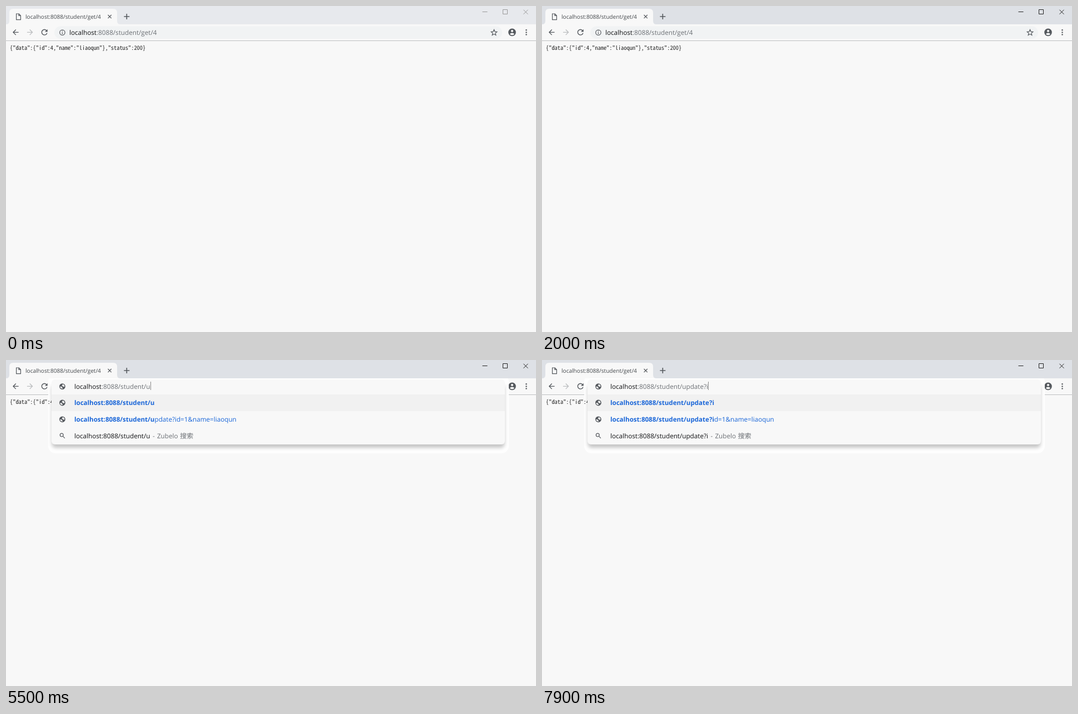
An HTML page for the animation above (8000 ms loop, 954 px wide and 587 px high).

```html
<!DOCTYPE html>
<html lang="en">
<head>
<meta charset="utf-8">
<title>Browser address bar</title>
<style>
  html, body { margin: 0; width: 100%; height: 100%; overflow: hidden; background: #f8f8f8; }
  svg { display: block; width: 954px; height: 587px; }
  text { font: 11.7px "Open Sans", "Noto Sans", sans-serif; text-rendering: geometricPrecision; white-space: pre; }
  .title { font-size: 10.1px; fill: #45494d; }
  .json { font: 300 10.4px "Noto Sans Mono CJK SC", "Noto Sans Mono", monospace; fill: #222; }
  .host { fill: #111214; }
  .path { fill: #6c7075; }
  .link { fill: #1a66d8; }
  .match { font-size: 11.55px; font-weight: 700; }
  .cjk { font: 12px "Noto Sans CJK SC", sans-serif; }
  .icon { fill: #55595e; }
  .line { fill: none; stroke: #55595e; stroke-width: 1.2; }
</style>
</head>
<body>
<svg viewBox="0 0 954 587">
  <defs>
    <filter id="soft" x="-5%" y="-20%" width="110%" height="150%">
      <feGaussianBlur stdDeviation="3.2"/>
    </filter>
    <clipPath id="belowTabs"><rect y="33" width="954" height="554"/></clipPath>
    <g id="globe">
      <circle r="5.4"/>
      <path fill="#f8f8f8" d="M.4 -4.1Q3.6 -3.6 4.1 0Q2.6 1.2 1.4 .4Q1.2 -.8 -.6 -.8Q-1.4 -2 .2 -2.4ZM-4.1 .2Q-.8 -.2 -.6 1.6Q.8 2 .4 4.1Q-3.6 4 -4.1 .2Z"/>
    </g>
    <path id="arrow" transform="scale(.66) translate(-12 -12)" d="M20 11H7.83l5.59-5.59L12 4l-8 8 8 8 1.41-1.41L7.83 13H20z"/>
  </defs>

  <!-- page and tab strip -->
  <rect width="954" height="587" fill="#f8f8f8"/>
  <rect id="strip" width="954" height="33"/>
  <path fill="#f8f8f8" d="M0 33Q6 33 6 27V12Q6 5 13 5H193Q200 5 200 12V27Q200 33 206 33Z"/>
  <path id="doc" class="line" d="M18.6 14H23.2L26.4 17.2V24.6H18.6ZM23 14V17.4H26.4"/>
  <path id="spinner" class="line" d="M22 14.2A4.8 4.8 0 1 0 26.8 19"/>
  <text class="title" x="35" y="23">localhost:8088/student/get/4</text>
  <path class="line" d="M183.5 16l6.2 6.2M189.7 16l-6.2 6.2"/>
  <path class="line" style="stroke-width:1.6" d="M212.3 19h10M217.3 14v10"/>
  <path id="controls" fill="none" d="M857.5 10.5h9M894.5 6.5h8v8h-8zM931.5 6.8l8 8M939.5 6.8l-8 8"/>

  <!-- toolbar -->
  <path d="M0 62.5H954" stroke="#bdbfc1"/>
  <use href="#arrow" class="icon" transform="translate(17.3 47.3)"/>
  <use href="#arrow" fill="#bcbec0" transform="translate(43.2 47.3) scale(-1 1)"/>
  <path id="reload" class="icon" transform="translate(69.2 47.3) scale(.69) translate(-12 -12)" d="M17.65 6.35C16.2 4.9 14.21 4 12 4c-4.42 0-7.99 3.58-7.99 8s3.57 8 7.99 8c3.73 0 6.84-2.55 7.73-6h-2.08c-.82 2.33-3.04 4-5.65 4-3.31 0-6-2.69-6-6s2.69-6 6-6c1.66 0 3.14.69 4.22 1.78L13 11h7V4z"/>
  <path id="stop" class="line" style="stroke-width:1.5" d="M64.8 43l8.8 8.8M73.6 43l-8.8 8.8"/>
  <circle class="icon" cx="911" cy="47.4" r="6.8"/>
  <circle fill="#f8f8f8" cx="911" cy="45" r="2.1"/>
  <path fill="#f8f8f8" d="M906.9 50.6Q908.4 48.6 911 48.6T915.1 50.6Q913.6 52.6 911 52.6T906.9 50.6Z"/>
  <g class="icon">
    <circle cx="936.5" cy="43.2" r="1.25"/>
    <circle cx="936.5" cy="47.4" r="1.25"/>
    <circle cx="936.5" cy="51.6" r="1.25"/>
  </g>

  <!-- address field -->
  <g id="field">
    <rect id="pill" x="87" y="36.5" width="806" height="22.4" rx="11.2"/>
    <circle class="line" cx="101.4" cy="47.8" r="4.7"/>
    <path class="line" d="M101.4 47.2v3.2M101.4 44.8v1.3"/>
    <path class="line" d="M878.5 42.6L880 46.1 883.8 46.4 880.9 48.9 881.8 52.6 878.5 50.6 875.2 52.6 876.1 48.9 873.2 46.4 877 46.1Z"/>
    <rect id="selection" x="243" y="39" width="30" height="17" fill="#0078d7"/>
    <text x="114" y="51.5"><tspan class="host">localhost</tspan><tspan class="path">:8088/student/</tspan><tspan id="tail">get/4</tspan></text>
  </g>

  <!-- suggestions -->
  <rect id="halo" x="76" y="26" width="829" height="142" rx="13" fill="#fefefe" clip-path="url(#belowTabs)"/>
  <text class="json" x="7" y="79">{"data":{"id":4,"name":"liaoqun"},"status":200}</text>
  <g id="popup">
    <g clip-path="url(#belowTabs)">
      <rect x="82.5" y="44" width="815" height="114" rx="7" opacity=".22" filter="url(#soft)"/>
    </g>
    <rect x="82" y="35" width="816" height="117" rx="6" fill="#f8f8f8"/>
    <rect x="82" y="62" width="816" height="30" fill="#f1f1f1"/>
    <g class="icon">
      <use href="#globe" transform="translate(101.4 47.6)"/>
      <use href="#globe" transform="translate(101.4 77)"/>
      <use href="#globe" transform="translate(101.4 106.8)"/>
    </g>
    <path class="line" d="M103.1 135.1a2.9 2.9 0 1 1-5.8 0a2.9 2.9 0 1 1 5.8 0M102.4 137.2l3.4 3.6"/>
    <text x="123" y="51.5"><tspan class="host">localhost</tspan><tspan class="path" id="typed"></tspan></text>
    <text x="123" y="81" class="link"><tspan class="match" data-match></tspan></text>
    <text x="123" y="111" class="link"><tspan class="match" data-match></tspan><tspan id="rest"></tspan></text>
    <text x="123" y="141" class="host"><tspan id="query"></tspan><tspan class="path" dx="4.5">-</tspan><tspan class="path" dx="4.2">Zubelo</tspan><tspan class="path cjk" dx="3.8">搜索</tspan></text>
  </g>
  <rect id="caret" y="39" width="1" height="15" fill="#888"/>
</svg>

<script>
const LOOP = 8000;
const BASE = ":8088/student/";
const SUGGESTION = "update?id=1&name=liaoqun";

// start time, mode, caret x (0 hides it), typed letters
const STEPS = [
  [0, "inactive", 0],
  [700, "focus", 273],
  [1300, "focus", 0],
  [1700, "focus", 273],
  [1900, "loading", 0],
  [2000, "idle", 0],
  [4100, "focus", 243],
  [4500, "select", 0],
  [5500, "popup", 260, 1],
  [5600, "popup", 267, 2],
  [5700, "popup", 279, 4],
  [5900, "popup", 283, 5],
  [6000, "popup", 290, 6],
  [6500, "popup", 0, 6],
  [7000, "popup", 290, 6],
  [7200, "popup", 296, 7],
  [7600, "popup", 0, 7],
  [7900, "popup", 299, 8]
];

const $ = id => document.getElementById(id);
const show = (id, on) => { $(id).style.display = on ? "" : "none"; };
const paint = (id, attrs) => {
  for (const key in attrs) $(id).setAttribute(key, attrs[key]);
};

function render([, mode, caret, count = 0]) {
  const active = mode !== "inactive";
  const popup = mode === "popup";
  const loading = mode === "loading";
  const selected = mode === "select";
  const focused = mode === "focus" || selected;

  paint("strip", { fill: active ? "#dee1e6" : "#e7e9ed" });
  paint("controls", { stroke: active ? "#222" : "#999" });
  paint("pill", focused
    ? { fill: "#fbfbfb", stroke: "#a8c7fa", "stroke-width": 1.8 }
    : { fill: "#f1f3f4", stroke: "none" });
  $("tail").style.fill = selected ? "#fff" : "#6c7075";
  paint("caret", { x: caret });

  show("doc", !loading);
  show("spinner", loading);
  show("reload", !loading);
  show("stop", loading);
  show("field", !popup);
  show("selection", selected);
  show("halo", popup);
  show("popup", popup);
  show("caret", caret > 0);

  const path = BASE + SUGGESTION.slice(0, count);
  $("typed").textContent = path;
  $("query").textContent = "localhost" + path;
  $("rest").textContent = SUGGESTION.slice(count);
  document.querySelectorAll("[data-match]").forEach(el => { el.textContent = "localhost" + path; });
}

let current;
function tick() {
  const time = performance.now() % LOOP;
  const step = STEPS.findLast(([start]) => start <= time);
  if (step !== current) render(current = step);
  requestAnimationFrame(tick);
}
tick();
</script>
</body>
</html>
```
